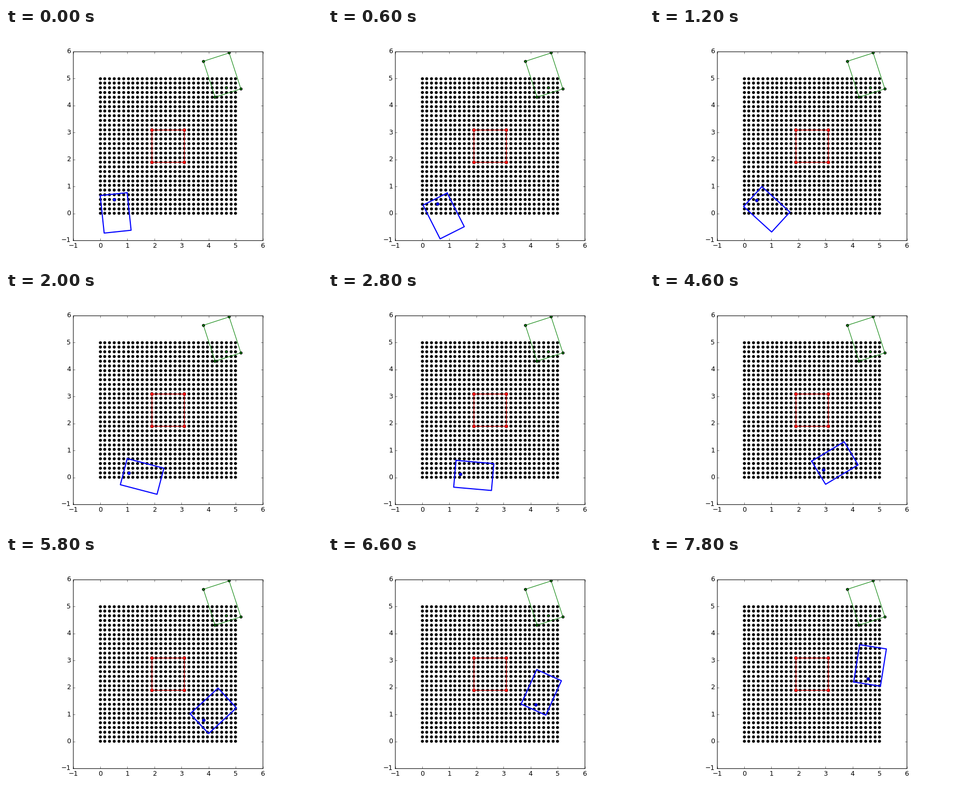
Write a matplotlib script that moves like this. It is 600x450 px and loops after 8000 ms.

```python
import numpy as np
import matplotlib.pyplot as plt
from matplotlib.animation import FuncAnimation

plt.style.use("classic")
plt.rcParams["font.family"] = "DejaVu Sans"

FRAMES, INTERVAL = 40, 200
LOW, HIGH = -1, 6
CELL = (HIGH - LOW) / 480            # raster on which markers and edges settle
FRONT, REAR, HALF = 1.2, 0.2, 0.5    # body extents around the rear axle

grid = np.linspace(0, 5, 30)
step = grid[1]                       # distance driven per frame

# heading in degrees, linear between a few key times
KEY_TIMES = [0, 11.4, 16, 18.5, 23, 24, 26, 32.3, 36.8, 39]
KEY_ANGLES = [-84, -5, -5, 0, 31, 31, 22, 65.7, 65.7, 81]


def plan(x, y):
    """Axle positions and headings: shunt to turn round, then drive off."""
    frame = np.arange(FRAMES)
    heading = np.radians(np.interp(frame, KEY_TIMES, KEY_ANGLES))
    mid = (heading[1:] + heading[:-1]) / 2
    move = frame[:-1]
    reverse = (move < 6) & (move % 2 == 1) | (move == 11)
    dist = np.where(reverse, -step, step)
    xs = x + np.append(0, np.cumsum(dist * np.cos(mid)))
    ys = y + np.append(0, np.cumsum(dist * np.sin(mid)))
    return list(zip(xs, ys, heading))


def outline(x, y, heading):
    """Closed outline of the car body."""
    along = np.array([-REAR, FRONT, FRONT, -REAR, -REAR])
    side = np.array([HALF, HALF, -HALF, -HALF, HALF])
    c, s = np.cos(heading), np.sin(heading)
    return x + along * c - side * s, y + along * s + side * c


def settle(v, shift=0):
    return LOW + (np.round((np.asarray(v) - LOW) / CELL) + shift) * CELL


def dots(x, y, color, size=20, edge=1, shift=0):
    # two edge colours keep the markers off the whole-pixel grid
    return ax.scatter(settle(x, shift), settle(y, -shift), s=size, c=color,
                      edgecolors=["k", "k"], linewidths=edge, zorder=2)


def square(low, high, color, **style):
    x = np.array([low, high, high, low, low])
    y = np.array([low, low, high, high, low])
    ax.plot(settle(x, 0.5), settle(y, -0.5), color=color, lw=1,
            snap=False, **style)
    return x[:4], y[:4]


fig = plt.figure(figsize=(8, 6), dpi=75, facecolor="white")
ax = fig.add_subplot(111)
ax.set_aspect("equal")
ax.set_xlim(LOW, HIGH)
ax.set_ylim(LOW, HIGH)
ax.spines[:].set_visible(False)
square(LOW, HIGH, "k", clip_on=False, zorder=3)

# free space
gx, gy = np.meshgrid(grid, grid)
dots(gx.ravel(), gy.ravel(), "k")

# obstacle
corners = square(1.9, 3.1, "r")
dots(*corners, "r", size=36, edge=0.5, shift=0.5)

# parking goal
goal = outline(grid[27], grid[27], np.radians(108))
ax.plot(*goal, "g-", lw=1)
dots(np.append(goal[0][:4], grid[27]), np.append(goal[1][:4], grid[27]), "g")

# car
poses = plan(grid[3], grid[3])
body, = ax.plot([], [], "b-", lw=2)
axle = dots([grid[3]], [grid[3]], "b", size=36, edge=0.5, shift=0.5)


def draw(i):
    x, y, heading = poses[i]
    body.set_data(*outline(x, y, heading))
    axle.set_offsets([(settle(x, 0.5), settle(y, -0.5))])
    return body, axle


anim = FuncAnimation(fig, draw, frames=FRAMES, interval=INTERVAL,
                     init_func=lambda: draw(0), repeat=True, repeat_delay=0)
plt.show()
```
